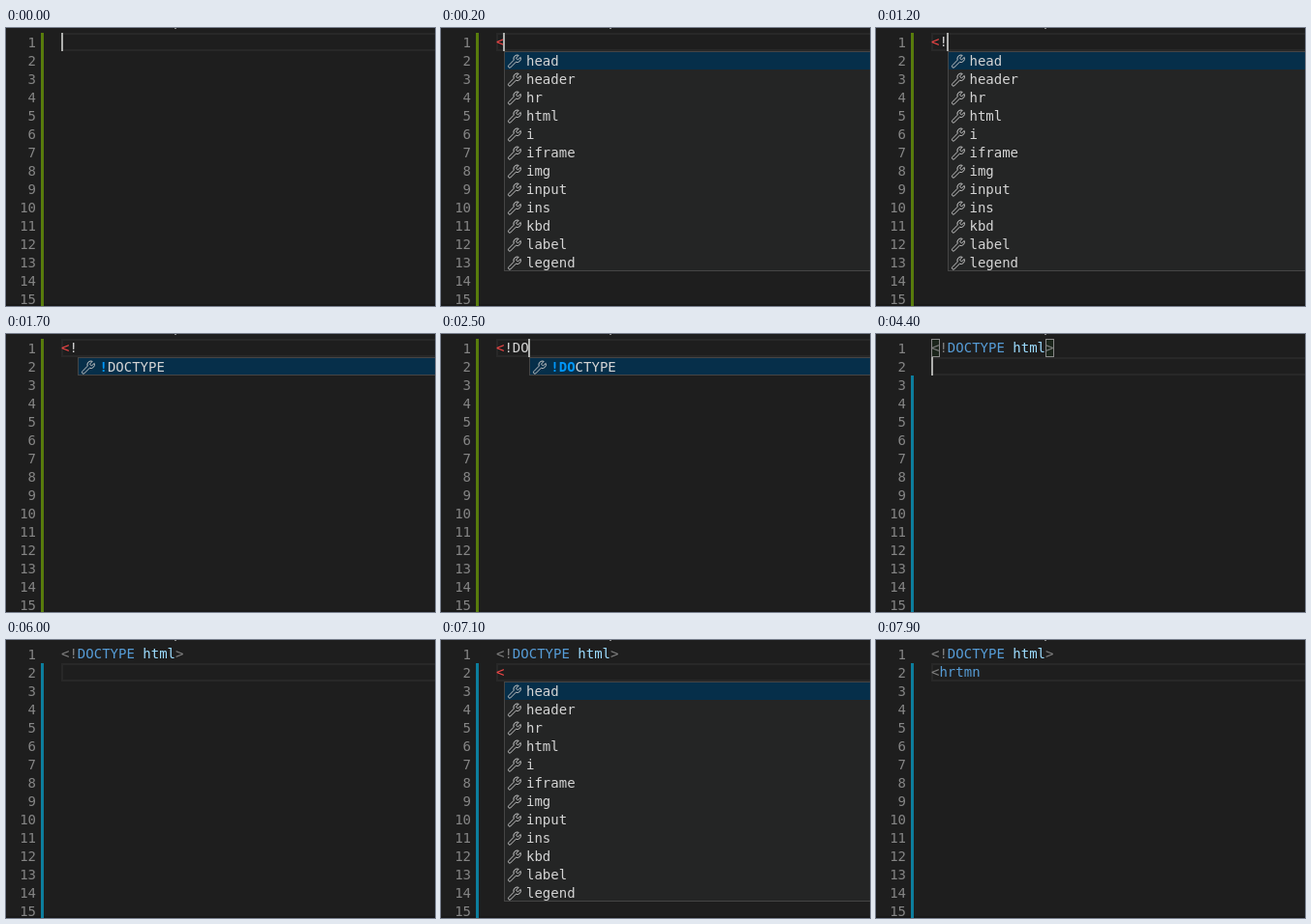
Animation of 443 by 288 pixels, one loop 8000 ms. Source, as an HTML page:

```html
<!DOCTYPE html>
<html lang="en">
<head>
<meta charset="utf-8">
<title>Typing a doctype in an editor</title>
<style>
  html, body { margin: 0; width: 100%; height: 100%; overflow: hidden; background: #1e1e1e; }
  svg { display: block; }
  text { font: 14px "DejaVu Sans Mono", monospace; white-space: pre; }
</style>
</head>
<body>
<svg id="stage" width="443" height="288" viewBox="0 0 443 288">
  <defs>
    <path id="wrench" fill="none" stroke="#c5c5c5" stroke-linejoin="round"
      d="M12.2 1.8A3.8 3.8 0 0 0 7.2 6.7L1.9 12.2a1.3 1.3 0 0 0 2 2L9.3 8.8A3.8 3.8 0 0 0 14.2 3.9L11.4 6.5 9.5 4.6Z"/>
  </defs>
  <rect y="286" width="443" height="2" fill="#191919"/>
  <rect x="174" width="2" height="1" fill="#8a8a8a"/>
  <g id="numbers" fill="#858585" text-anchor="end"></g>
  <g id="editor"></g>
</svg>
<script>
const LOOP = 8000, LEFT = 57, TOP = 5, ROW = 19, CHAR = 8.428;
const GREY = '#808080', BLUE = '#569cd6', PALE = '#9cdcfe', WHITE = '#d4d4d4', RED = '#f44747';
const GREEN_BAR = '#587c0c', BLUE_BAR = '#0c7d9d';

const TAGS = 'head header hr html i iframe img input ins kbd label legend'.split(' ');
const DOCTYPE = [['<!', GREY], ['DOCTYPE', BLUE], [' html', PALE], ['>', GREY]];
const OPEN = ['<', RED];
const typed = s => [OPEN, [s, WHITE]];
const tag = s => [['<', GREY], [s, BLUE]];

// Each step changes some of the editor state from its time onward.
const steps = [
  [0, { lines: [[]], caret: true, list: null, match: 0, bar: GREEN_BAR, barRow: 0, brackets: false }],
  [100, { lines: [[OPEN]] }],
  [200, { list: TAGS }],
  [600, { caret: false }],
  [1200, { lines: [typed('!')], caret: true }],
  [1400, { list: ['!DOCTYPE'], match: 1 }],
  [1700, { caret: false }],
  [2100, { lines: [typed('!D')], match: 2, caret: true }],
  [2500, { lines: [typed('!DO')], match: 3 }],
  [2900, { lines: [DOCTYPE], list: null, match: 0, brackets: true }],
  [3100, { bar: BLUE_BAR }],
  [3300, { caret: false }],
  [3800, { caret: true }],
  [4400, { lines: [DOCTYPE, []], barRow: 2 }],
  [4600, { barRow: 1, brackets: false }],
  [4900, { caret: false }],
  [5400, { caret: true }],
  [6000, { caret: false }],
  [6500, { caret: true }],
  [6600, { lines: [DOCTYPE, [OPEN]] }],
  [6700, { list: TAGS }],
  [7100, { caret: false }],
  [7300, { lines: [DOCTYPE, tag('hrt')], list: null, caret: true }],
  [7400, { lines: [DOCTYPE, tag('hrtmn')] }],
  [7900, { caret: false }],
];

const escapeText = s => s.replace(/</g, '&lt;').replace(/>/g, '&gt;');
const rect = (x, y, w, h, attrs) => `<rect x="${x}" y="${y}" width="${w}" height="${h}" ${attrs}/>`;
const span = ([s, color], extra = '') => `<tspan fill="${color}" ${extra}>${escapeText(s)}</tspan>`;
const rowTop = row => TOP + row * ROW;
const column = n => LEFT + n * CHAR;

function popup({ list, match }, col, row) {
  const left = Math.round(column(col)), top = rowTop(row);
  const items = list.map((name, i) => {
    const y = top + i * ROW;
    const label = span([name.slice(0, match), '#0097fb'], 'font-weight="bold"') + span([name.slice(match), WHITE]);
    return `<use href="#wrench" x="${left + 3}" y="${y + 2.5}"/>
      <text x="${column(col) + 22.6}" y="${y + 15}">${label}</text>`;
  });
  const height = list.length * ROW;
  return rect(left, top, 400, height, 'fill="#242525"')
    + rect(left, top, 400, ROW, 'fill="#062f4a"')
    + rect(left + .5, top + .5, 400, height - 1, 'fill="none" stroke="#454545"')
    + items.join('');
}

function draw(state) {
  const { lines, list, caret, bar, barRow, brackets } = state;
  const row = lines.length - 1, y = rowTop(row);
  const col = lines[row].map(part => part[0]).join('').length;
  let out = rect(36, rowTop(barRow), 3, 288, `fill="${bar}"`)
    + rect(LEFT + 1, y + 1, 400, ROW - 2, 'fill="none" stroke="#282828" stroke-width="2"');
  if (brackets) {
    for (const n of [0, 14]) {
      out += rect(Math.round(column(n)) + .5, TOP + .5, 8, ROW - 1, 'fill="#006400" fill-opacity=".1" stroke="#888"');
    }
  }
  lines.forEach((parts, i) => {
    out += `<text x="${LEFT}" y="${rowTop(i) + 14}">${parts.map(p => span(p)).join('')}</text>`;
  });
  if (list) out += popup(state, col, row + 1);
  if (caret) out += rect(col ? Math.round(column(col)) - 1 : LEFT, y, 2, ROW, 'fill="#aeafad"');
  editor.innerHTML = out;
}

const editor = document.getElementById('editor');
document.getElementById('numbers').innerHTML = Array.from({ length: 15 },
  (_, i) => `<text x="31" y="${rowTop(i) + 15}">${i + 1}</text>`).join('');

let shown = 0;
function tick(now) {
  const t = now % LOOP;
  const count = steps.filter(([start]) => start <= t).length;
  if (count !== shown) {
    shown = count;
    draw(Object.assign({}, ...steps.slice(0, count).map(([, change]) => change)));
  }
  requestAnimationFrame(time => tick(Math.max(0, time - begin)));
}
const begin = performance.now();
tick(0);
</script>
</body>
</html>
```
